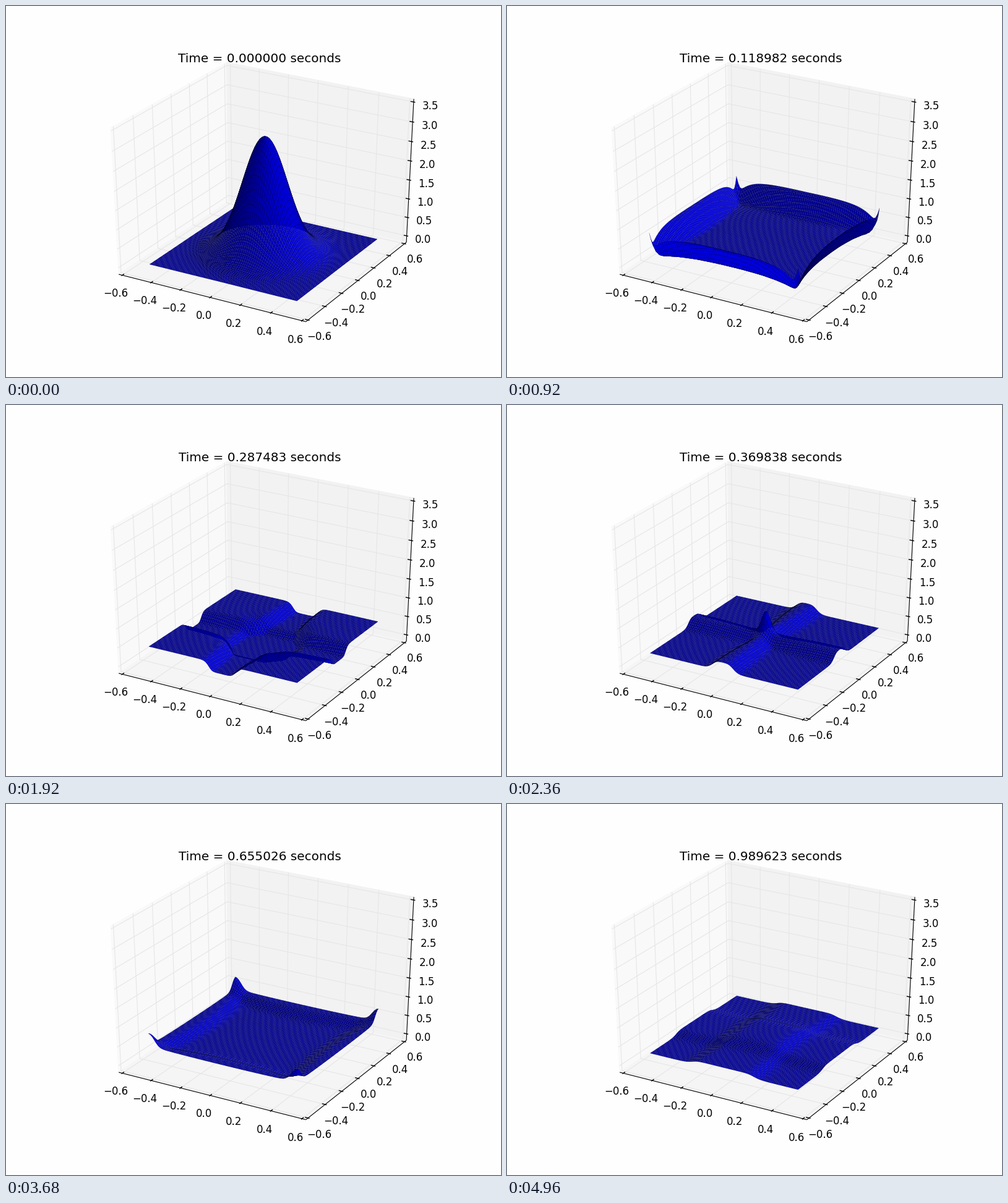
Recreate the animation shown at these times as a matplotlib script. Size 800 by 600 pixels, loop 5000 ms.

```python
import numpy as np
import matplotlib.pyplot as plt
from matplotlib.animation import FuncAnimation
from matplotlib.collections import QuadMesh
from matplotlib.colors import LinearSegmentedColormap
from matplotlib.patches import Polygon

plt.rcParams["font.family"] = "DejaVu Sans"

W, H = 800, 600
FRAMES, INTERVAL = 125, 40

# ---------------------------------------------------------------- projection
AZIM, ELEV, DIST = np.radians(-60), np.radians(30), 10
XY_LIM, Z_MIN, Z_MAX = 0.6, -0.1, 3.5

N_VEC = np.array([np.cos(AZIM) * np.cos(ELEV),
                  np.sin(AZIM) * np.cos(ELEV), np.sin(ELEV)])
U_VEC = np.array([-np.sin(AZIM), np.cos(AZIM), 0])
V_VEC = np.cross(N_VEC, U_VEC)


def project(x, y, z):
    """Box coordinates (-0.5..0.5) to pixels."""
    p = np.stack(np.broadcast_arrays(x, y, z), axis=-1).astype(float)
    depth = DIST - p @ N_VEC
    px = 100 + (p @ U_VEC / depth + 0.095) * 620 / 0.185
    py = 540 - (p @ V_VEC / depth + 0.095) * 480 / 0.185
    return px, py


def box_xy(value):
    return value / (2 * XY_LIM)


def box_z(value):
    return (value - Z_MIN) / (Z_MAX - Z_MIN) - 0.5


# ------------------------------------------------------------- water physics
CELLS = 80
DX = 1 / CELLS
GRAVITY = 9.8
CENTERS = (np.arange(CELLS) + 0.5) * DX - 0.5


def sweep(q):
    """Flux divergence along the first grid axis, with solid walls."""
    p = np.pad(q, ((0, 0), (1, 1), (0, 0)), mode="edge")
    p[1, [0, -1]] *= -1
    h, m, s = p
    u = m / h
    flux = np.stack([m, m * u + GRAVITY * h * h / 2, s * u])
    speed = np.abs(u) + np.sqrt(GRAVITY * h)
    a = np.maximum(speed[:-1], speed[1:])
    face = (flux[:, :-1] + flux[:, 1:] - a * (p[:, 1:] - p[:, :-1])) / 2
    return (face[:, 1:] - face[:, :-1]) / DX, a.max()


def swap(q):
    return q[[0, 2, 1]].transpose(0, 2, 1)


def simulate(times):
    x, y = np.meshgrid(CENTERS, CENTERS, indexing="ij")
    q = np.zeros((3, CELLS, CELLS))
    q[0] = 3 * np.exp(-(x**2 + y**2) / 0.035) + 1e-3
    now, heights = 0.0, []
    for goal in times:
        while now < goal - 1e-12:
            dqx, ax_speed = sweep(q)
            dqy, ay_speed = sweep(swap(q))
            dt = min(0.45 * DX / max(ax_speed, ay_speed), goal - now)
            q = q - dt * (dqx + swap(dqy))
            q[0] = np.maximum(q[0], 1e-6)
            now += dt
        heights.append(q[0].copy())
    return heights


def clock(frame):
    """Simulated seconds: steps grow as the waves slow down."""
    keys = np.array([0, 23, 48, 71, 92, 106, 124])
    secs = np.array([0, 0.118982, 0.287483, 0.466406,
                     0.655026, 0.795883, 0.989623])
    slope = np.gradient(secs, keys, edge_order=2)
    k = min(np.searchsorted(keys, frame, side="right") - 1, len(keys) - 2)
    span = keys[k + 1] - keys[k]
    t = (frame - keys[k]) / span
    return (secs[k] * (1 + 2 * t) * (1 - t)**2
            + secs[k + 1] * t * t * (3 - 2 * t)
            + span * slope[k] * t * (1 - t)**2
            - span * slope[k + 1] * t * t * (1 - t))


TIMES = [clock(i) for i in range(FRAMES)]
HEIGHTS = simulate(TIMES)

# --------------------------------------------------------------------- stage
BACK = "#fefefe"
GRID = "0.9"
LEFT, REAR, FLOOR = "0.975", "0.95", "0.9625"
WATER = LinearSegmentedColormap.from_list("water", [(0, 0, 0.5), (0, 0, 1)])

fig = plt.figure(figsize=(W / 100, H / 100), dpi=100, facecolor=BACK)
ax = fig.add_axes([0, 0, 1, 1])
ax.set_xlim(0, W)
ax.set_ylim(H, 0)
ax.axis("off")


def line(points, color, width, z):
    px, py = project(*zip(*points))
    ax.plot(px, py, color=color, lw=width, zorder=z, solid_capstyle="butt")


def pane(points, color):
    px, py = project(*zip(*points))
    ax.add_patch(Polygon(np.column_stack([px, py]), fc=color, ec=color,
                         lw=1, zorder=0))


def tick(inner, outer, anchor, value):
    line([inner, outer], "black", 1, 2)
    px, py = project(*anchor)
    ax.text(px, py + 14.1, f"{value:.1f}".replace("-", "\u2212"),
            size=12, ha="center", va="baseline", zorder=5)


STEP = 1 / 12
E = 0.5 + STEP / 4                          # box edge
OUT, IN = E + 0.1 * STEP, E - 0.2 * STEP    # tick ends
L = E + 8 / 11 * STEP                       # tick labels

pane([(-E, -E, -E), (-E, E, -E), (-E, E, E), (-E, -E, E)], LEFT)
pane([(-E, E, -E), (E, E, -E), (E, E, E), (-E, E, E)], REAR)
pane([(-E, -E, -E), (E, -E, -E), (E, E, -E), (-E, E, -E)], FLOOR)

for value in np.arange(-3, 4) / 5:
    b = box_xy(value)
    line([(b, -E, -E), (b, E, -E), (b, E, E)], GRID, 0.8, 1)
    line([(E, b, -E), (-E, b, -E), (-E, b, E)], GRID, 0.8, 1)
    tick((b, -IN, -E), (b, -OUT, -E), (b, -L, -L), value)
    tick((IN, b, -E), (OUT, b, -E), (L, b, -L), value)

for value in np.arange(8) / 2:
    b = box_z(value)
    line([(-E, -E, b), (-E, E, b), (E, E, b)], GRID, 0.8, 1)
    tick((IN, E, b), (OUT, E, b), (L, L, b), value)

line([(-E, -E, -E), (E, -E, -E)], "black", 0.8, 2)
line([(E, -E, -E), (E, E, -E)], "black", 0.8, 2)
line([(E, E, -E), (E, E, E)], "black", 0.8, 2)

title = ax.text(410, 91.4, "", size=14.4, ha="center", va="baseline", zorder=5)

# Rows run from the far side to the near side, so cells paint back to front.
MESH_X, MESH_Y = np.meshgrid(box_xy(CENTERS), box_xy(CENTERS[::-1]))


def shade(h):
    """Brightness of each cell from its tilt against the light."""
    hx = (h[1:, 1:] + h[1:, :-1] - h[:-1, 1:] - h[:-1, :-1]) / (2 * DX)
    hy = (h[1:, 1:] - h[1:, :-1] + h[:-1, 1:] - h[:-1, :-1]) / (2 * DX)
    return (-hx - hy - 0.5) / np.sqrt(1 + hx**2 + hy**2)


def light(h):
    """The lamp sits below the sheet, so rising slopes are the bright ones."""
    return -shade(h) - 1 / np.sqrt(1 + 0 * h[1:, 1:])


def update(i):
    for old in list(ax.collections):
        old.remove()
    h = HEIGHTS[i]
    px, py = project(MESH_X, MESH_Y, box_z(h.T[::-1]))
    mesh = QuadMesh(np.stack([px, py], axis=-1), antialiased=True,
                    cmap=WATER, edgecolors="black", linewidths=0.1, zorder=3)
    mesh.set_array(shade(h).T[::-1])
    ax.add_collection(mesh, autolim=False)
    title.set_text(f"Time = {TIMES[i]:.6f} seconds")
    return mesh, title


anim = FuncAnimation(fig, update, frames=FRAMES, interval=INTERVAL,
                     repeat=True, repeat_delay=0)
plt.show()
```
